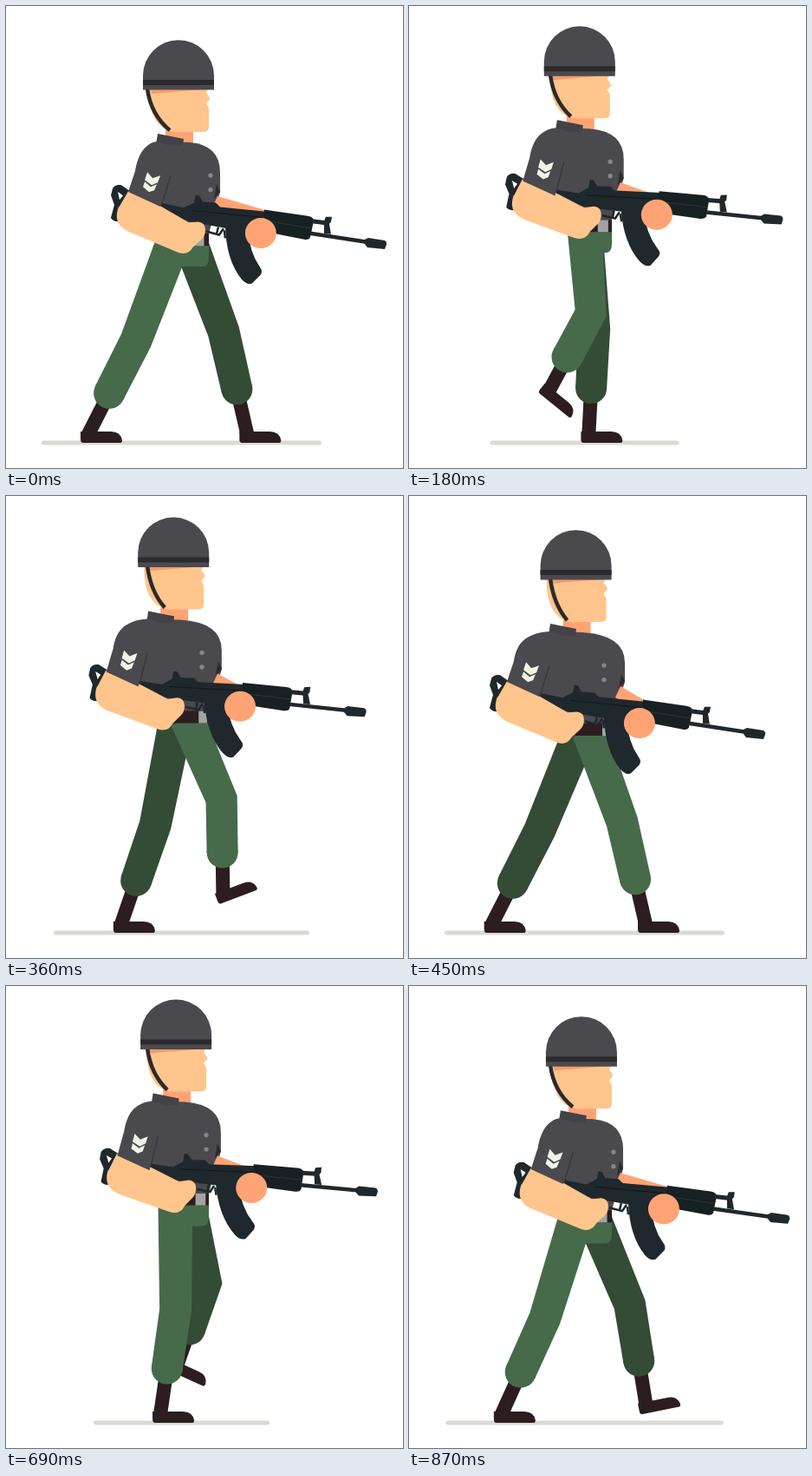
Write an HTML page with a canvas that moves like this. It is 458x532 px and loops after 0.9 s.

```html
<!DOCTYPE html>
<html lang="en">
<head>
<meta charset="utf-8">
<title>Walk cycle</title>
<style>
html, body { margin: 0; width: 458px; height: 532px; overflow: hidden; background: #fff; }
canvas { display: block; }
</style>
</head>
<body>
<canvas id="stage" width="458" height="532"></canvas>
<script>
const ctx = document.getElementById('stage').getContext('2d');
const { sin, cos, PI } = Math;
const LOOP = 900, STEP = 30, GROUND_Y = 503, RAD = PI / 180;
const C = {
  cloth: '#4a494e', clothDark: '#434247', band: '#2b2a2e', near: '#476a4b', far: '#344b36',
  boot: '#2b1d20', skin: '#ffc58c', skinDark: '#ffa375', gun: '#1f282c', gunDark: '#172023',
  patch: '#eff4e6', button: '#858489', ground: '#dadbd0', buckle: '#a3a3a4'
};

function fill(color, d) {
  ctx.fillStyle = color;
  ctx.fill(new Path2D(d));
}

function line(color, width, d) {
  ctx.strokeStyle = color;
  ctx.lineWidth = width;
  ctx.stroke(new Path2D(d));
}

function ellipse(color, x, y, rx, ry = rx) {
  ctx.fillStyle = color;
  ctx.beginPath();
  ctx.ellipse(x, y, rx, ry, 0, 0, PI * 2);
  ctx.fill();
}

function group(dx, dy, angle, px, py, draw) {
  ctx.save();
  ctx.translate(px + dx, py + dy);
  ctx.rotate(angle);
  ctx.translate(-px, -py);
  draw();
  ctx.restore();
}

// Heel position, foot angle and shin tilt: swing for half a loop, then stance.
function stride(phase) {
  const swing = phase < 0.5, u = phase * 2 % 1;
  if (!swing) return { x: 264 - 178 * u, y: GROUND_Y, foot: 0, tilt: 40 * u - 13, bend: 0 };
  const bend = sin(PI * u), twist = sin(2 * PI * u);
  return {
    x: 86 + 178 * u * u * (3 - 2 * u),
    y: GROUND_Y - 62 * bend ** 1.2,
    foot: 20 * bend + 24 * twist - 10 * sin(3 * PI * u),
    tilt: 27 - 40 * u + 15 * bend + 5 * twist,
    bend
  };
}

function leg(color, phase, hipX, hipY, shift) {
  const s = stride(phase), heelX = s.x + shift, a = s.foot * RAD, tilt = s.tilt * RAD;
  const along = ([x, y], length) => [x + length * sin(tilt), y - length * cos(tilt)];
  const ankle = [heelX + 9 * cos(a) + 10 * sin(a), s.y + 9 * sin(a) - 10 * cos(a)];
  const cuff = along(ankle, 53 - 10 * s.bend);
  const knee = along(cuff, 68 - 11 * s.bend);

  ctx.lineCap = 'round';
  line(C.boot, 16, `M${ankle}L${cuff}`);
  group(heelX, s.y, a, 0, 0, () => fill(C.boot, 'M3 0Q0 0 0-4V-13H35Q46-13 48-3Q48 0 46 0Z'));

  const thigh = Math.atan2(knee[1] - hipY, knee[0] - hipX), shin = tilt + PI / 2;
  const joints = [[hipX, hipY, thigh, 20], [...knee, (thigh + shin) / 2, 18.5], [...cuff, shin, 18]];
  const edge = side => joints.map(([x, y, dir, r]) => [x - side * r * sin(dir), y + side * r * cos(dir)]);
  fill(color, 'M' + [...edge(-1), ...edge(1).reverse()].join('L') + 'Z');
  ellipse(color, ...cuff, 18);
}

function head(shift) {
  fill(C.skinDark, 'M184 138H216V160H184Z');
  fill(C.skin, 'M165 94H234L231 100Q236 106 235 108L231 112L234 118V139Q234 145 228 145H192Q164 139 165 94Z');
  fill('#f59a6d', 'M167 96H228L168 101Z');
  line(C.band, 4.5, `M${163 - shift} 95Q${167 - shift} 125 189 143`);
  fill(C.cloth, 'M158 96.5V80A41 41 0 0 1 240 80V96.5Z');
  fill(C.band, 'M158 85H240V91H158Z');
}

function rifle() {
  fill(C.gun, 'M123 210Q126 205 133 206L146 215L142 242L132 248Q124 249 121 244L125 229L121 218Z');
  fill('#fff', 'M129 214L135 218L131 223ZM130 231L134 235L129 240Z');
  fill(C.gun, 'M253 252Q254 292 272 314Q278 321 284 319L294 309Q297 305 293 300Q281 283 279 256Z');
  line(C.gun, 2.5, 'M231 259L246 263L251 256M245 254L243 262M252 258L253 267');
  fill(C.gun, 'M176 226L205 232L217 226L219 217L223 218L227 225L242 226L247 231L300 236V258L278 260L212 248L178 240Z');
  line('#101719', 1, 'M214 235L296 243');
  fill(C.gunDark, 'M298 234L348 241Q355 242 355 247L351 266Q349 269 344 268L297 259Z');
  line('#2b363a', 1, 'M302 247L352 255');
  line(C.gun, 5, 'M353 247L369 249');
  fill(C.gun, 'M367 247L369 242H376L375 248L373 250L375 262L367 261Z');
  line(C.gun, 4.5, 'M351 261L418 271');
  fill(C.gun, 'M414 268L418 266L437 269Q440 271 439 274L437 279L417 277L414 273Z');
  ellipse(C.skinDark, 294, 261, 18, 17.5);
}

function forearm() {
  fill(C.skin, 'M141 213L129 234Q124 251 140 259L195 282Q209 289 216 277L226 268Q230 264 230 257Q230 249 222 248L211 249L178 230Z');
}

function torso(sway, yaw, armX) {
  const edge = 248 - sway, left = 219 - 4 * sway, right = 230.5 - 2 * sway;
  fill(C.boot, 'M192 261H234V276H192Z');
  fill(C.buckle, `M${left} 262H${right}V276H${left}Z`);
  fill(C.cloth, `M${174 + yaw} 156L${212 + yaw} 157Q${edge} 160 ${edge} 192V214L234 262H192L${179 + armX} 230Z`);
  fill(C.band, `M${edge - 4} 205L${edge} 214L${edge - 7} 222Z`);
  fill(C.clothDark, `M${175 + yaw} 147L${205 + yaw} 153L${204 + yaw} 161L${173 + yaw} 160Z`);
  ellipse(C.button, 236 + yaw * 0.92, 195, 2.7);
  ellipse(C.button, 236 + yaw * 0.92, 211.5, 2.7);
}

function render(time) {
  const phase = time / LOOP, opposite = (phase + 0.5) % 1;
  const turn = phase * 2 * PI, beat = turn * 2, sway = cos(turn);
  const top = 28 + 13.3 * cos(beat - 0.58), dy = top - 39;
  const headX = 3.2 * (sway - 1), yaw = 6 * (sway - 1);
  const armX = 14 * (sway - 1), armY = dy * 0.8;
  const tilt = (dy * 0.16 + 0.15 - 0.35 * sin(turn)) * RAD;
  const hipSway = 8.5 * cos(turn - 2.6), nearHip = 200.5 + hipSway, farHip = 205 - hipSway;
  const inBody = draw => group(0, dy, 0, 0, 0, draw);
  const inArm = draw => group(armX, armY, tilt, 122, 225, draw);

  ctx.fillStyle = '#fff';
  ctx.fillRect(0, 0, 458, 532);
  const half = 132.5 + 30.5 * cos(beat) - 4 * cos(2 * beat);
  ctx.lineCap = 'round';
  line(C.ground, 5, `M${202.5 - half} ${GROUND_Y}H${202.5 + half}`);

  leg(C.far, opposite, farHip, top + 232, 3 + 3 * cos(turn - 0.7));
  leg(C.near, phase, nearHip, top + 232, 0);
  ctx.lineCap = 'butt';
  inBody(() => fill(C.near, `M${nearHip} 275H234V290Q234 300 226 300H${nearHip}Z`));

  group(headX, dy, 0, 0, 0, () => head(headX));
  inBody(() => torso(sway, yaw, armX));
  fill(C.skinDark, `M244 ${219 + dy}L${299 + armX} ${235 + dy}L${294 + armX} ${250 + dy}L238 ${232 + dy}Z`);
  inArm(() => {
    rifle();
    forearm();
  });

  // Sleeve: top follows the shoulder, hem follows the arm.
  const sx = 174 + yaw, sy = 156 + dy;
  fill(C.cloth, `M${sx} ${sy}C${160 + armX} ${sy + 2} ${152 + armX} ${sy + 16} ${149 + armX} ${sy + 34}` +
    `L${141 + armX} ${214 + armY}L${178 + armX} ${231 + armY}L${190 + armX} ${196 + dy}L${sx + 31} ${sy + 10}Z`);
  inArm(() => {
    line('#37363b', 1.2, 'M190 195L179 230');
    fill(C.patch, 'M163 191L169 198L178 195L175 203L168 206L160 200ZM160 202L167 208L174 205L171 212L165 214L158 208Z');
  });
}

const start = performance.now();
function tick() {
  const time = (performance.now() - start) % LOOP;
  render(Math.floor(time / STEP) * STEP);
  requestAnimationFrame(tick);
}
tick();
</script>
</body>
</html>
```
